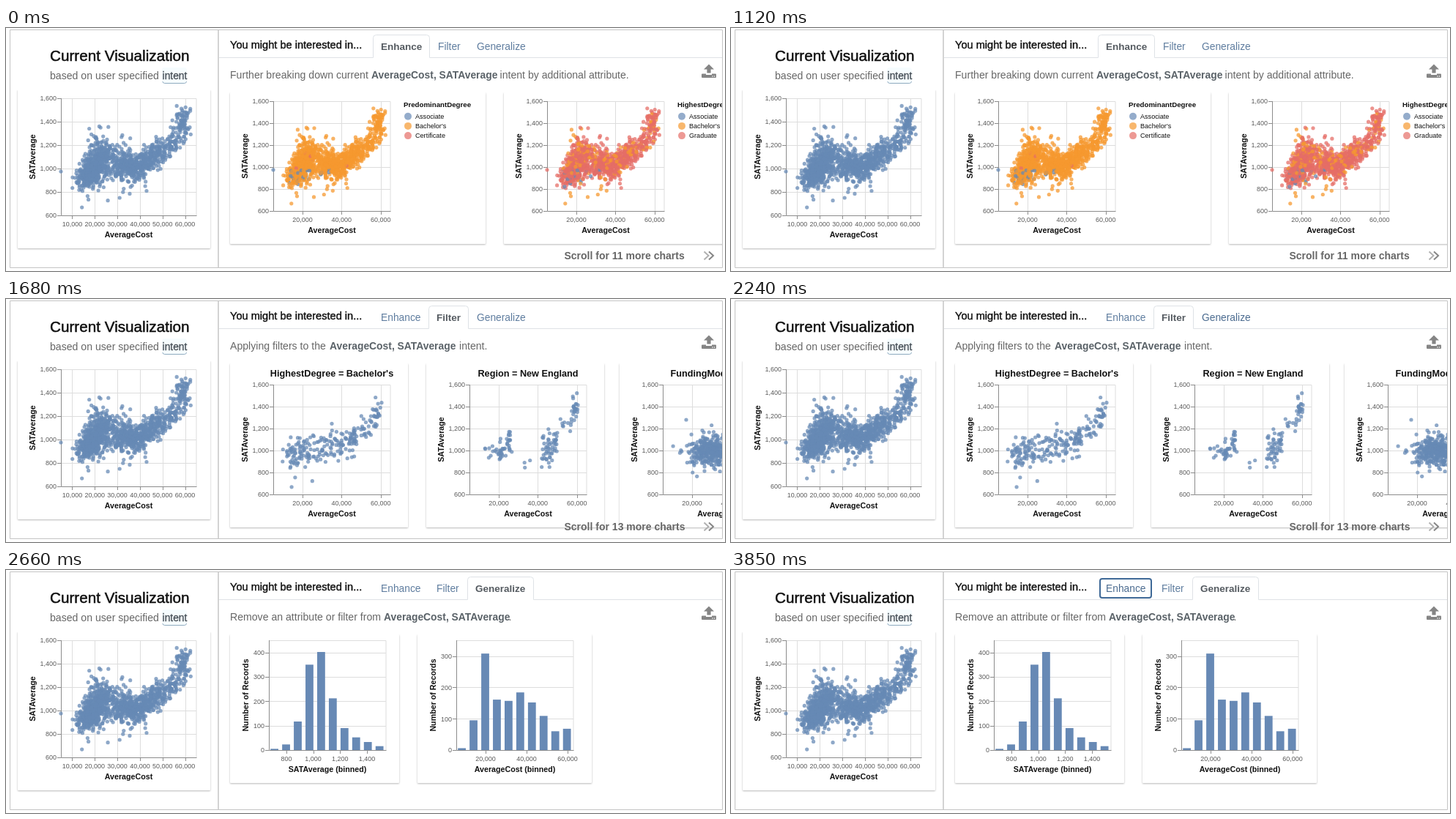
Recreate the animation shown at these times as an HTML page. Size 982 by 332 pixels, loop 3920 ms.

```html
<!DOCTYPE html>
<html lang="en">
<head>
<meta charset="utf-8">
<title>Chart recommendations</title>
<style>
  html, body { margin: 0; width: 100%; height: 100%; overflow: hidden; background: #fff; }
  svg { display: block; width: 982px; height: 332px; font-family: "Liberation Sans", Arial, sans-serif; }
  text { fill: #666; font-size: 14.1px; white-space: pre; }
  .h1 { font-size: 20.7px; fill: #111; stroke: #111; stroke-width: .5px; }
  .h2 { font-size: 14.6px; fill: #111; stroke: #111; stroke-width: .4px; }
  .attr { font-size: 13.85px; font-weight: bold; fill: #5a6268; }
  .intent { font-size: 13.8px; fill: #444c54; stroke: #444c54; stroke-width: .3px; }
  .link { font-size: 13.8px; fill: #5f7d9f; }
  .on { font-size: 13.5px; font-weight: bold; fill: #555b61; }
  .more { font-size: 14px; font-weight: bold; }
  .tick { font-size: 9px; fill: #5a5a5a; }
  .axis { font-size: 10.7px; font-weight: bold; fill: #111; }
  .head { font-size: 12.7px; font-weight: bold; fill: #111; }
  .key { font-size: 9.1px; fill: #111; }
  .keyhead { font-size: 9.7px; font-weight: bold; fill: #111; }
  .card { fill: #fff; filter: drop-shadow(0 1px 1px rgba(0, 0, 0, .28)); }
  .grid { stroke: #ddd; fill: none; }
  .dom { stroke: #8c8c8c; fill: none; }
  .edge { stroke: #c4c4c4; fill: none; }
  .tab { stroke: #dee2e6; fill: #fff; }
</style>
</head>
<body>
<svg id="stage" viewBox="0 0 982 332">
  <clipPath id="pane"><rect x="291" y="3" width="687" height="324"/></clipPath>
</svg>
<script>
const LOOP = 3920, TO_FILTER = 1680, TO_GENERAL = 2660;
const BLUE = '#6789b5', ORANGE = '#f5992f', RED = '#e66d67';
const stage = document.getElementById('stage');

function add(parent, name, attrs, content) {
  const el = document.createElementNS('http://www.w3.org/2000/svg', name);
  for (const k in attrs) el.setAttribute(k, attrs[k]);
  if (content) el.textContent = content;
  parent.append(el);
  return el;
}
const group = (parent, attrs) => add(parent, 'g', attrs);
const path = (parent, d, cls) => add(parent, 'path', { d, class: cls });
const text = (parent, x, y, s, cls = '', anchor = 'start') =>
  add(parent, 'text', { x, y, class: cls, 'text-anchor': anchor }, s);
const card = (parent, x, y, right, bottom) =>
  add(parent, 'rect', { x, y, width: right - x, height: bottom - y, rx: 1, class: 'card' });

// Hard steps: [[ms, value], ...]
function cue(el, prop, steps) {
  const keys = steps.map(([ms, v]) => ({ offset: ms / LOOP, [prop]: v, easing: 'step-end' }));
  keys.push({ offset: 1, [prop]: steps[steps.length - 1][1] });
  el.animate(keys, { duration: LOOP, iterations: Infinity });
}

// Seeded randomness
let seed = 7;
function rnd() {
  seed = (seed + 0x6D2B79F5) | 0;
  let t = Math.imul(seed ^ (seed >>> 15), 1 | seed);
  t ^= t + Math.imul(t ^ (t >>> 7), 61 | t);
  return ((t ^ (t >>> 14)) >>> 0) / 4294967296;
}
const bell = () => (rnd() + rnd() + rnd() - 1.5) * 2;
const many = (n, make) => Array.from({ length: n }, make);
const trend = (n, x0, x1, y0, slope, spread) => many(n, () => {
  const x = x0 + rnd() * (x1 - x0);
  return [x, y0 + (x - x0) * slope + spread * bell()];
});
const blob = (n, x, sx, y, sy) => many(n, () => [x + sx * bell(), y + sy * bell()]);

function shuffle(a) {
  for (let i = a.length - 1; i > 0; i--) {
    const j = Math.floor(rnd() * (i + 1));
    [a[i], a[j]] = [a[j], a[i]];
  }
  return a;
}

// Points are [cost in thousands, score]
const schools = shuffle([
  ...many(430, () => {
    const x = 19.6 + 3.2 * bell();
    return [x, 1000 + (x - 19.6) * 9 + 62 * bell()];
  }),
  ...many(110, () => [23 + 2.6 * bell(), 1080 + 95 * Math.abs(bell())]),
  ...trend(50, 24, 36, 1110, 0, 75),
  ...many(460, () => {
    const x = 38 + 6.2 * bell();
    return [x, 1020 + Math.max(0, x - 38) * 9 + 58 * bell()];
  }),
  ...trend(110, 44, 57, 1100, 12, 62),
  ...blob(85, 58.6, 1.7, 1370, 75),
  ...trend(35, 10, 18, 890, 6, 48),
  ...trend(20, 18, 45, 870, 2, 45),
  [5, 975], [14.3, 668], [17.2, 735], [25.8, 727], [31, 750], [35.5, 785],
  [26, 1355], [22, 1360], [32.2, 1285], [16.8, 765], [56.3, 1535], [62.3, 1510]
]).filter(([x, y]) => x < 63 && y < 1545);

const bachelors = [
  ...trend(165, 12, 47, 940, 4.2, 66), ...trend(45, 44, 58, 1100, 15, 60),
  ...blob(16, 58.3, 1.2, 1380, 55),
  [14.4, 668], [16.2, 755], [25, 722], [9.8, 900], [10, 1010], [35, 1245]
];
const newEngland = [
  ...blob(34, 21, 3, 990, 42), ...trend(12, 24, 27, 1050, 45, 45),
  ...trend(50, 42, 50, 960, 18, 72), ...trend(9, 50, 57, 1170, 8, 50),
  ...blob(26, 58.8, 1, 1385, 62),
  [13, 1020], [13.1, 1015], [33.2, 890], [33.4, 845], [36, 910], [42, 850], [46, 850]
];
const funding = [
  ...blob(430, 34, 6, 995, 64), ...blob(55, 24, 5, 990, 75),
  [17, 1280], [10.3, 1040], [22.5, 765], [20.3, 800], [30, 1230], [17.5, 890]
];

function axes(g, x, y, w, h, xs, ys, xTitle, yTitle, gap, vertical) {
  let grid = `M${x} ${y + .5}h${w}v${h}`, marks = '';
  for (const [px, label] of xs) {
    const X = Math.round(px) + .5;
    if (vertical) grid += `M${X} ${y}v${h}`;
    marks += `M${X} ${y + h}v5`;
    text(g, px, y + h + 14.5, label, 'tick', 'middle');
  }
  for (const [py, label] of ys) {
    const Y = Math.round(py) + .5;
    grid += `M${x} ${Y}h${w}`;
    marks += `M${x} ${Y}h-5`;
    text(g, x - 6, py + 3.3, label, 'tick', 'end');
  }
  path(g, grid, 'grid');
  path(g, `${marks}M${x + .5} ${y}v${h + .5}h${w}`, 'dom');
  text(g, x + w / 2, y + h + 29.6, xTitle, 'axis', 'middle');
  add(g, 'text', {
    class: 'axis', 'text-anchor': 'middle',
    transform: `translate(${x - gap + 4} ${y + h / 2}) rotate(-90)`
  }, yTitle);
}

function scatter(g, x, y, w, h, step, points, color = () => BLUE) {
  const sx = v => x + (v - 5) * w / 60, sy = v => y + (1600 - v) * h / 1000;
  const xs = [], ys = [];
  for (let v = step; v <= 60; v += step) xs.push([sx(v), v + ',000']);
  for (let v = 600; v <= 1600; v += 200) ys.push([sy(v), v.toLocaleString('en-US')]);
  axes(g, x, y, w, h, xs, ys, 'AverageCost', 'SATAverage', 39, true);
  const dots = group(g, { 'fill-opacity': .74 });
  for (const p of points) {
    add(dots, 'circle', { cx: sx(p[0]).toFixed(1), cy: sy(p[1]).toFixed(1), r: 2.6, fill: color(p) });
  }
}

function bars(g, x, xs, scale, top, values, title) {
  const ys = [];
  for (let v = 0; v <= top; v += 100) ys.push([246 - v * scale, String(v)]);
  axes(g, x, 96, 160, 150, xs, ys, title, 'Number of Records', 32, false);
  values.forEach((v, i) => add(g, 'rect', {
    x: x + 2.2 + i * 15.95, y: 246 - v * scale, width: 10.8, height: v * scale, fill: BLUE
  }));
}

function legend(g, x, title, names) {
  text(g, x, 108, title, 'keyhead');
  names.forEach((name, i) => {
    const y = 120.7 + i * 13.2;
    add(g, 'circle', { cx: x + 6, cy: y, r: 5, fill: [BLUE, ORANGE, RED][i], 'fill-opacity': .7 });
    text(g, x + 16, y + 3.3, name, 'key');
  });
}

// Tabs: [label, x]; returns label elements by name
function tabs(g, list, active, left, right) {
  path(g, `M291 40.5H${left}.5V13.5q0 -4 4 -4H${right - 4}.5q4 0 4 4V40.5H978`, 'tab');
  const out = {};
  for (const [name, x] of list) out[name] = text(g, x, 30, name, name === active ? 'on' : 'link');
  return out;
}

function ring(g, x, right, steps) {
  const r = add(g, 'rect', {
    x: x + 1, y: 12, width: right - x - 2, height: 26, rx: 3,
    fill: 'none', stroke: '#3f6997', 'stroke-width': 2
  });
  cue(r, 'opacity', steps);
}

const attrs = (g, x) => text(g, x, 69, 'AverageCost, SATAverage', 'attr');

function more(g, n) {
  text(g, 762.5, 316, `Scroll for ${n} more charts`, 'more');
  const c = group(g, { fill: 'none', 'stroke-width': 2 });
  add(c, 'path', { d: 'M953.5 305.5l6 5.5l-6 5.5', stroke: '#b0b0b0' });
  add(c, 'path', { d: 'M960 305.5l6 5.5l-6 5.5', stroke: '#858585' });
}

function upload(g) {
  const i = group(g, { fill: '#858585' });
  add(i, 'path', { d: 'M960 49.5L967 56.5H962.6V61.5H957.4V56.5H953Z' });
  add(i, 'path', { d: 'M951 62.5H956V64H964V62.5H969Q970 62.5 970 63.5V67Q970 68 969 68H951Q950 68 950 67V63.5Q950 62.5 951 62.5Z' });
  for (const cx of [965, 967.6]) add(i, 'circle', { cx, cy: 66, r: .8, fill: '#fff' });
}

// Left panel
const side = group(stage);
card(side, 16, 84, 279, 301);
add(side, 'rect', { x: 10, y: 78, width: 274, height: 7, fill: '#fff' });
text(side, 60, 45, 'Current Visualization', 'h1');
text(side, 60, 69.5, 'based on user specified');
add(side, 'rect', { x: 213, y: 54, width: 34, height: 21, rx: 4, fill: '#f6fcfe' });
add(side, 'path', { d: 'M213.7 73q.8 2.5 3 2.5h27q2.200 0 3 -2.5', fill: 'none', stroke: '#8fabc0' });
text(side, 213.6, 69.5, 'intent', 'intent');
scatter(side, 75, 96, 185, 160, 10, schools);

// Right panel
const main = group(stage, { 'clip-path': 'url(#pane)' });
const [enhance, filter, general] = [0, 1, 2].map(() => group(main));
cue(enhance, 'opacity', [[0, 1], [TO_FILTER, 0]]);
cue(filter, 'opacity', [[0, 0], [TO_FILTER, 1], [TO_GENERAL, 0]]);
cue(general, 'opacity', [[0, 0], [TO_GENERAL, 1]]);

const LINK = '#5f7d9f', HOVER = '#4c6c90';

{
  const g = enhance;
  const t = tabs(g, [['Enhance', 512], ['Filter', 590], ['Generalize', 643]], 'Enhance', 501, 578);
  cue(t.Filter, 'fill', [[0, LINK], [1190, HOVER]]);
  ring(g, 581, 630, [[0, 0], [1540, .5], [1610, 1], [TO_FILTER, 0]]);
  text(g, 306, 69, 'Further breaking down current');
  attrs(g, 499);
  text(g, 674.5, 69, 'intent by additional attribute.');
  card(g, 306, 88, 655, 295);
  card(g, 680, 88, 1030, 295);
  const low = p => p[1] < 985 && p[0] < 34;
  scatter(g, 365, 100, 160, 150, 20, schools, p =>
    low(p) && p[1] > 820 && rnd() < .15 ? BLUE : rnd() < .006 ? RED : ORANGE);
  scatter(g, 739, 100, 160, 150, 20, schools, p => {
    const r = rnd();
    if (p[1] < 800) return ORANGE;
    if (low(p) && r < .12) return BLUE;
    return r < .18 ? ORANGE : RED;
  });
  legend(g, 543, 'PredominantDegree', ['Associate', "Bachelor's", 'Certificate']);
  legend(g, 917, 'HighestDegree', ['Associate', "Bachelor's", 'Graduate']);
  more(g, 11);
}

{
  const g = filter;
  const t = tabs(g, [['Enhance', 512], ['Filter', 588], ['Generalize', 643]], 'Filter', 577, 631);
  cue(t.Generalize, 'fill', [[0, LINK], [1960, HOVER]]);
  ring(g, 634, 718, [[0, 0], [2450, .5], [2520, 1], [TO_GENERAL, 0]]);
  text(g, 306, 69, 'Applying filters to the');
  attrs(g, 442);
  text(g, 619, 69, 'intent.');
  const charts = [
    [306, "HighestDegree = Bachelor's", bachelors],
    [574, 'Region = New England', newEngland],
    [838, 'FundingModel = Public', funding]
  ];
  for (const [x, title, points] of charts) {
    card(g, x, 88, x + 243, 312);
    text(g, x + 139, 105.5, title, 'head', 'middle');
    scatter(g, x + 59, 117, 160, 150, 20, points);
  }
  more(g, 13);
}

{
  const g = general;
  const t = tabs(g, [['Enhance', 512], ['Filter', 588], ['Generalize', 641]], 'Generalize', 630, 720);
  cue(t.Filter, 'fill', [[0, LINK], [3290, HOVER], [3430, LINK]]);
  cue(t.Enhance, 'fill', [[0, LINK], [3500, HOVER]]);
  ring(g, 503, 575, [[0, 0], [3850, 1]]);
  text(g, 306, 69, 'Remove an attribute or filter from');
  attrs(g, 516);
  text(g, 686.5, 69, '.');
  card(g, 306, 88, 537, 291);
  card(g, 562, 88, 800, 291);
  bars(g, 359, [[383, '800'], [419.6, '1,000'], [456.3, '1,200'], [493, '1,400']], .3333, 400,
    [5, 23, 117, 350, 402, 212, 90, 52, 33, 16], 'SATAverage (binned)');
  bars(g, 615, [[655, '20,000'], [711, '40,000'], [767, '60,000']], .428, 300,
    [6, 95, 308, 161, 157, 184, 152, 109, 60, 68], 'AverageCost (binned)');
}

for (const g of [enhance, filter, general]) {
  add(g, 'rect', { x: 292, y: 80, width: 686, height: 8, fill: '#fff' });
}
text(main, 306, 27.5, 'You might be interested in...', 'h2');
upload(main);

path(stage, 'M5.5 2.5H978.5V327.5H5.5Z', 'edge');
add(stage, 'path', { d: 'M290 2V328', stroke: '#c8c8c8', 'stroke-width': 1.6 });
</script>
</body>
</html>
```
